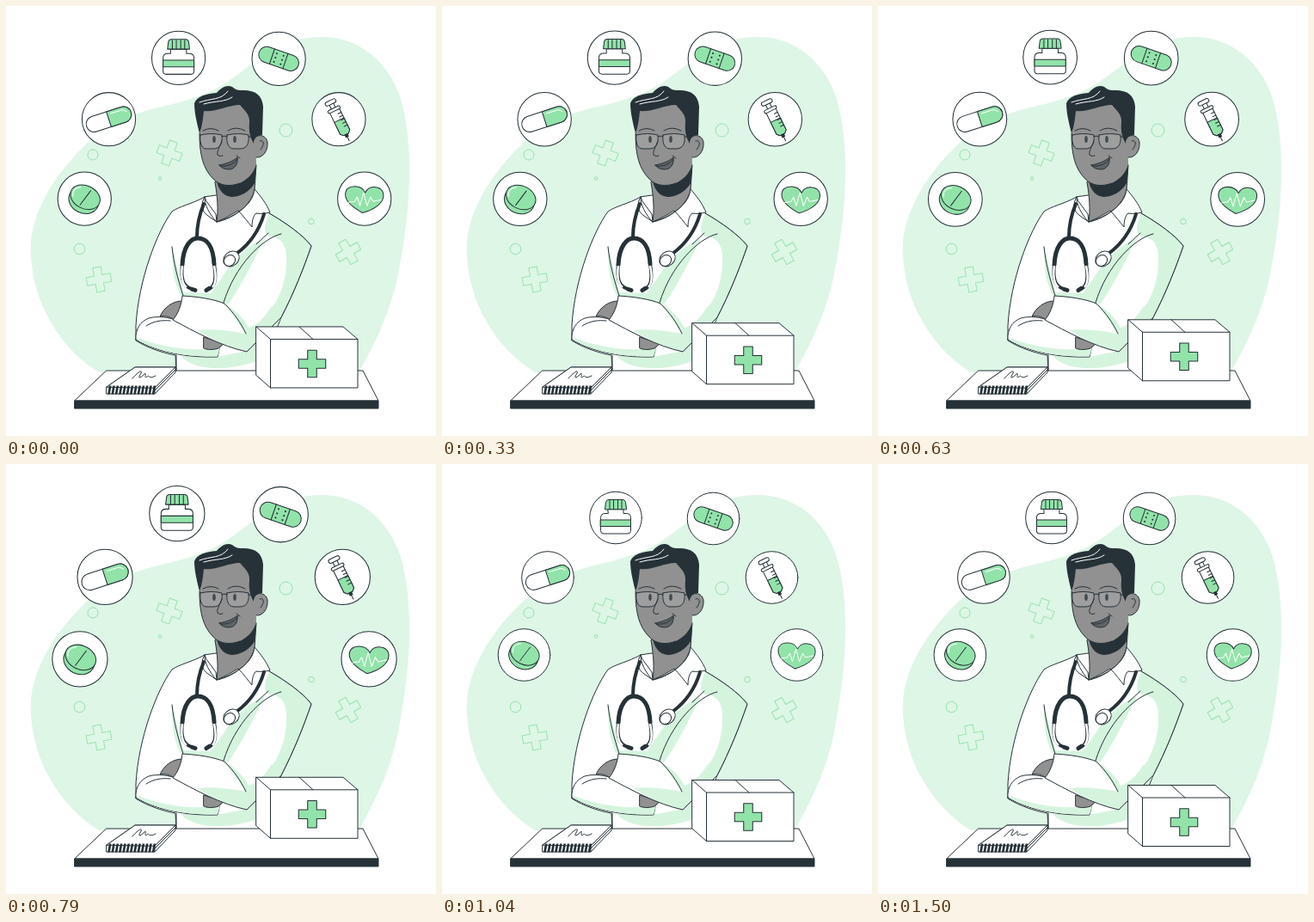
An HTML page for the animation above (1540 ms loop, 500 px wide and 500 px high).

```html
<!DOCTYPE html>
<html lang="en">
<head>
<meta charset="utf-8">
<title>Doctor with medical icons</title>
<style>
  html, body { margin: 0; width: 100%; height: 100%; overflow: hidden; background: #fff; }
  svg { display: block; width: 100vw; height: 100vh; }
  .ink { stroke: #263238; stroke-width: 1; stroke-linecap: round; stroke-linejoin: round; }
  .bold { stroke-width: 2; }
  .line { fill: none; }
  .white { fill: #fff; }
  .green { fill: #92e3a9; }
  .shade { fill: #d5f4de; stroke: none; }
  .skin { fill: #919191; }
  .dark { fill: #263238; }
  .shine { fill: none; stroke: #fff; stroke-width: 1; stroke-linecap: round; stroke-linejoin: round; }
  .tube { fill: none; stroke: #263238; stroke-width: 4; stroke-linecap: round; }
  .thick { stroke-width: 5; }
  .decor { fill: none; stroke: #92e3a9; stroke-width: 1; }
</style>
</head>
<body>
<svg viewBox="0 0 500 500">
  <defs>
    <path id="plus" d="M-5-15H5V-5H15V5H5V15H-5V5H-15V-5H-5Z"/>
    <circle id="disc" r="30.3" class="ink white"/>
  </defs>

  <path fill="#def6e6" d="M365 36C403 35 441 57 458 105C475 160 471 235 457 306C451 340 438 378 410 426H108C66 400 32 350 29 290C25 242 60 188 105 150C128 130 160 122 190 115C214 109 234 102 250 93C284 72 315 36 365 36Z"/>

  <g class="decor">
    <use href="#plus" transform="translate(190 171) rotate(20) scale(.95)"/>
    <use href="#plus" transform="translate(108 318) rotate(-10) scale(.95)"/>
    <use href="#plus" transform="translate(398 286) rotate(-30) scale(.95)"/>
    <circle cx="101" cy="173" r="6"/>
    <circle cx="179" cy="200.500" r="1.800"/>
    <circle cx="325.500" cy="144.500" r="7.500"/>
    <circle cx="85.500" cy="282.500" r="6.300"/>
    <circle cx="355" cy="250.500" r="3.300"/>
  </g>

  <g id="icons">
    <g transform="translate(95.500 222)">
      <use href="#disc"/>
      <g transform="rotate(25)">
        <ellipse class="ink green" cy="2" rx="17.500" ry="14.500"/>
        <ellipse class="ink green" cy="-2" rx="17.500" ry="13"/>
      </g>
      <path class="ink line" d="M-5 7L7-9"/>
      <path class="shine" d="M-13-3C-14-9-10-13-4-13"/>
    </g>
    <g transform="translate(123 132)">
      <use href="#disc"/>
      <g transform="rotate(-18)">
        <rect class="ink white" x="-26.500" y="-9" width="53" height="18" rx="9"/>
        <path class="ink green" d="M0-9H17.500A9 9 0 0 1 17.500 9H0Z"/>
        <path class="shine" d="M4-5.500H17Q20-5 22-2"/>
      </g>
    </g>
    <g transform="translate(202 62.500)">
      <use href="#disc"/>
      <path class="ink white" d="M-9-10H9V-5H12Q17.500-5 17.500 0V15Q17.500 18.500 14 18.500H-14Q-17.500 18.500-17.500 15V0Q-17.500-5-12-5H-9Z"/>
      <rect class="ink green" x="-17.500" y="2.500" width="35" height="7.500"/>
      <path class="ink green" d="M-12.500-10L-11.500-18Q-11-21-8-21H8Q11-21 11.500-18L12.500-10Z"/>
      <path class="ink line" d="M-7-20V-10M-2.500-20V-10M2.500-20V-10M7-20V-10"/>
    </g>
    <g transform="translate(315.500 63.500)">
      <use href="#disc"/>
      <g transform="rotate(19)">
        <rect class="ink green" x="-23.500" y="-9" width="47" height="18" rx="9"/>
        <path class="ink line" d="M-8-9V9M8-9V9"/>
        <path class="ink line bold" d="M-4-5h.01M4-5h.01M-4 0h.01M4 0h.01M-4 5h.01M4 5h.01"/>
      </g>
    </g>
    <g transform="translate(383.500 132)">
      <use href="#disc"/>
      <g transform="rotate(-26)">
        <path class="ink white" d="M-2.500-20H2.500V-12H-2.500Z"/>
        <rect class="ink white" x="-6.500" y="-23.500" width="13" height="4.500" rx="2.200"/>
        <path class="ink white" d="M-6-12H6V16L3 19H-3L-6 16Z"/>
        <path class="ink green" d="M-6 1H6V16L3 19H-3L-6 16Z"/>
        <rect class="ink white" x="-7.500" y="-14" width="15" height="3.500" rx="1.700"/>
        <path class="ink line" d="M6-6H2M6-2H2M6 2H2M6 6H2M6 10H2"/>
        <path class="ink dark" d="M-1.500 19H1.500V22H-1.500ZM0 22V27"/>
      </g>
    </g>
    <g transform="translate(412.500 222)">
      <use href="#disc"/>
      <path class="ink green" d="M-2 16C-13 10-21 4-21.500-4C-22-11-17-14-11-14C-5-14-1-11 1-7C3-11 7-14 13-13C20-12 23-7 21 0C18 8 8 13-2 16Z"/>
      <path class="shine" d="M-18 4L-11 3L-8-2L-5 8L-1-7L3 8L7-2L10 3L19 1"/>
    </g>
  </g>

  <!-- coat -->
  <path class="ink white" d="M231 222C217 230 201 233 193 239C176 262 154 318 151 372V389C165 398 185 404 197 406L198 425H295L320 362C335 333 346 305 355 279C345 266 325 252 306 241L289 214Z"/>
  <path class="shade" d="M306 241C325 252 345 266 355 279C346 305 335 333 320 362L309 351C321 336 327 312 326 292C326 276 318 268 306 268C298 264 301 253 306 241Z"/>
  <path class="shade" d="M301 270C276 281 261 300 251 316L238 334L206 333L194 282C192 302 195 322 204 338L258 347C272 328 286 300 301 270Z"/>
  <path class="shade" d="M203 407L250 407L280 401L320 362L294 412C270 422 222 428 203 407Z"/>
  <path class="ink line" d="M193 280C195 300 200 318 206 337M320 265C298 270 266 302 253 345M291 277L305 264M198 406V425"/>
  <path class="ink line" d="M306 241C325 252 345 266 355 279C346 305 335 333 320 362"/>

  <!-- crossed arms -->
  <path class="ink white" d="M151 388C150 376 156 367 166 363C176 360 190 362 200 366L250 391L246 408C214 409 178 404 151 388Z"/>
  <path class="shade" d="M154 386C180 396 215 403 249 397L246 407.500C214 408.500 178 403 154 389Z"/>
  <path class="ink skin" d="M230 385C238 388 246 390 254 392L247 398C241 400 234 400 230 398Z"/>
  <path class="ink skin" d="M205 343C194 343 184 350 179 361C184 360 190 361 196 365Z"/>
  <path class="white" d="M205 337C224 338 242 341 254 346L306 350L320 362L280 402C251 396 218 378 194 365C200 358 204 348 205 337Z"/>
  <path class="shade" d="M254 346L279 381C258 377 236 375 223 377C240 389 260 397 280 402L320 362L309 349C299 365 290 372 282 374C275 361 266 353 254 346Z"/>
  <path class="ink line" d="M320 362L280 402C251 396 218 378 194 365C200 358 204 348 205 337C224 338 242 341 254 346C265 357 273 368 279 381M163 372C172 366 182 365 191 366"/>

  <!-- neck and collar -->
  <path class="ink skin" d="M243 205C246 222 247 237 245 251C262 248 284 234 289 214L291 185Z"/>
  <path class="ink white" d="M231 222C230 230 237 243 245 251L244 242L233 227ZM245 251C255 247 263 242 270 238C276 244 281 251 286 257C286 249 288 243 291 241C297 242 302 241 307 240C303 230 296 221 289 213C287 232 266 245 245 251Z"/>
  <path class="ink line" d="M231 222C226 230 227 239 235 244L245 251"/>

  <!-- stethoscope -->
  <path class="tube" d="M230 230C225 242 222 254 222 269M300 242C294 262 283 277 268 288"/>
  <path class="tube thick" d="M205 301C206 279 215 270 223 270C234 270 241 280 242 300"/>
  <path class="tube" d="M205 300C203 318 206 326 216 329M242 300C245 318 243 326 236 329"/>
  <path fill="none" stroke="#fff" stroke-width="2.500" d="M205 302C203 316 206 324 210 327M242 302C245 316 243 324 240 327"/>
  <path class="tube thick" d="M217 329.500L220 330.500M236 328.500L233 330.500"/>
  <ellipse class="ink white" cx="262" cy="294" rx="10" ry="8" transform="rotate(-40 262 294)"/>
  <ellipse class="ink white" cx="260" cy="296" rx="7" ry="6" transform="rotate(-40 260 296)"/>

  <!-- head -->
  <path class="dark" d="M245 203L291 184L289.500 205C284 216 272 222 262 222C253 221 247 214 245 203Z"/>
  <path class="ink skin" d="M287 156C291 148 302 149 304 158C305 168 299 177 291 176Z"/>
  <path class="skin" d="M228 104L225 148C225 173 229 189 241 201C249 210 262 210 272 206C282 201 288 194 291 184L290 104Z"/>
  <path class="ink line" d="M225 148C225 173 229 189 241 201C249 210 262 210 272 206"/>
  <path class="dark" d="M225 148C222 136 219 124 219 113C222 105 232 102 245 101C250 95 257 91 263 94C267 97 269 98 273 98C289 97 298 103 299 117L298 150C292 150 288 154 288 160C284 153 282 146 283 136C284 126 277 121 272 115C258 115 243 124 230 122C229 132 228 140 225 148Z"/>
  <path class="shine" d="M225 112C238 107 250 110 258 99M230 114C244 110 254 112 263 106"/>
  <path class="ink line" d="M229 145Q238 140 247 145M258 145Q267 139 278 145"/>
  <ellipse class="dark" cx="242" cy="155" rx="1.800" ry="4"/>
  <ellipse class="dark" cx="266" cy="155" rx="1.800" ry="4"/>
  <path class="ink" fill="#fff" fill-opacity=".12" d="M226 150Q239 147 251 150C252 160 249 166 241 166H233C227 166 225 158 226 150ZM257 150Q270 147 282 150C283 160 280 166 272 166H265C258 166 256 158 257 150Z"/>
  <path class="ink line" d="M251 152Q254 150 257 152M282 152L289 153M251 157C248 164 245 170 246 173Q249 176 252 174M295 157C300 155 301 161 296 167"/>
  <path class="ink" fill="#5f6467" d="M248 185C254 184 264 181 269 176C270 184 266 190 259 190C254 190 250 188 248 185Z"/>
  <path class="ink line" d="M249 186C257 187 265 184 269 178M268 174L272 177"/>

  <!-- desk and notebook -->
  <path class="ink white" d="M117 424H415L433 459H80Z"/>
  <path class="ink dark" d="M80 459H433V468H80Z"/>
  <path class="ink white" d="M117 443L150 420H197V426L173 451H117Z"/>
  <path class="ink white" d="M117 443L150 420H197L173 444Z"/>
  <path class="ink line" d="M173 444V450M197 423L173 447"/>
  <path class="ink line" d="M147 433C153 426 159 422 157 427C152 435 157 432 161 428C164 424 160 435 164 431C167 428 165 435 174 430"/>
  <path fill="none" stroke="#263238" stroke-width="10" stroke-dasharray="2.700 1.600" transform="translate(119 446.500) skewX(-10)" d="M0 0H55"/>

  <g id="box">
    <path class="ink white" d="M291 373.500H392L409 388V444.500H307.500L291 430Z"/>
    <path class="ink line" d="M291 373.500L307.500 388H409M307.500 388V444.500M341 373.500L357 388"/>
    <use href="#plus" class="ink green" transform="translate(356 416.500) scale(1.050)"/>
  </g>
</svg>
<script>
  const PERIOD = 1540, LEAD = 40, LIFT = 10;
  const beat = [[0, 1], [.1, 1.1], [.3, 1], [.4, 1], [.5, 1.1], [.6, 1], [1, 1]];
  const icons = document.getElementById('icons');
  const box = document.getElementById('box');

  function sample(keys, p) {
    const i = keys.findIndex(([at]) => at > p);
    const [a, from] = keys[i - 1], [b, to] = keys[i];
    return from + (to - from) * (p - a) / (b - a);
  }

  function draw(now) {
    const p = (now + LEAD) % PERIOD / PERIOD;
    const rise = LIFT * (1 - Math.abs(1 - 2 * p));
    icons.setAttribute('transform', `translate(254 142) scale(${sample(beat, p)}) translate(-254 -142)`);
    box.setAttribute('transform', `translate(0 ${-rise})`);
  }

  const start = performance.now();
  function tick() {
    draw(performance.now() - start);
    requestAnimationFrame(tick);
  }
  tick();
</script>
</body>
</html>
```
